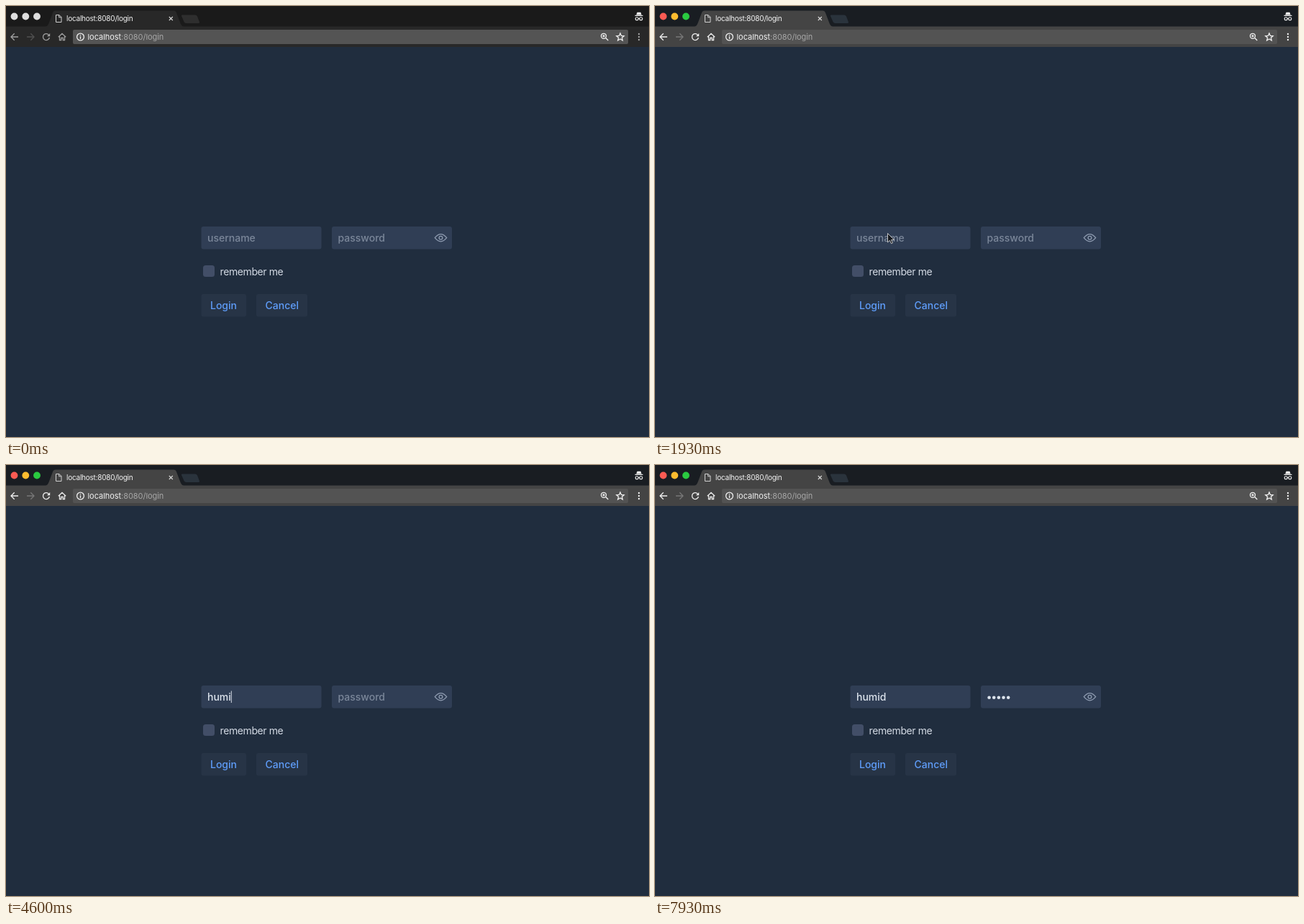
These frames come from a looping animation (894x600 px, 8000 ms). An HTML page:

```html
<!DOCTYPE html>
<html lang="en">
<head>
<meta charset="utf-8">
<title>Login</title>
<style>
  html, body { margin: 0; width: 100%; height: 100%; overflow: hidden; background: #202d3e; }
  svg { display: block; width: 100%; height: 100%; font: 14px Inter, "Open Sans", sans-serif; }
  .line { fill: none; stroke: var(--icon); stroke-width: 1.3; }
  .white { fill: none; stroke: #f2f2f2; stroke-width: 1.3; }
  .hint { fill: #7b879a; font-weight: 500; }
  .value { fill: #dce3ec; font-weight: 500; }
  .button { fill: #5f9dfa; font-weight: 500; }
  .field { fill: #303e55; }
  .box { fill: #273446; }
  .caret { fill: #d3dae4; }
</style>
</head>
<body>
<svg id="stage" viewBox="0 0 894 600">
  <rect width="894" height="600" fill="#202d3e"/>

  <g id="browser">
    <rect width="894" height="29" fill="var(--title)"/>
    <rect y="28.5" width="894" height="28.5" fill="var(--bar)"/>
    <path d="M55 29Q58 28 59.500 24L65 9.500Q66 6.500 69 6.500H233Q236 6.500 237 9.500L242.500 24Q244 28 247 29Z" fill="var(--bar)"/>
    <path d="M245 12.500H263Q265 12.500 266 14.500L269 22.500Q269.500 24 267.500 24H250.500Q248.500 24 247.500 22L244 14Q243.500 12.500 245 12.500Z" fill="var(--plus)"/>
    <circle cx="11.5" cy="14.500" r="4.900" fill="var(--close)"/>
    <circle cx="27.300" cy="14.500" r="4.900" fill="var(--min)"/>
    <circle cx="43" cy="14.500" r="4.900" fill="var(--max)"/>

    <path d="M69.500 12.500H74L77 15.500V22.500H69.500ZM73.700 12.500V15.800H77" fill="none" stroke="#d0d0d0"/>
    <text x="84" y="21" fill="#f4f4f4" font-size="10" letter-spacing="-.23">localhost:8080/login</text>
    <path d="M226.800 15L231.800 20M231.800 15L226.800 20" fill="none" stroke="#d8d8d8" stroke-width="1.100"/>

    <g fill="#eee">
      <path d="M876.300 12.500L877.500 8.700H882.500L883.700 12.500Z"/>
      <rect x="874.500" y="12.800" width="11" height="1.200"/>
      <path d="M875.200 17.800a2 2 0 1 0 4 0a2 2 0 1 0-4 0M880.800 17.800a2 2 0 1 0 4 0a2 2 0 1 0-4 0M879 17.500H881" fill="none" stroke="#eee" stroke-width="1.100"/>
    </g>

    <rect x="93" y="33" width="772" height="20" rx="2" fill="var(--address)"/>
    <path class="line" d="M17 43H7M11.700 38.300L7 43L11.700 47.700"/>
    <path d="M29 43H39M34.300 38.300L39 43L34.300 47.700" fill="none" stroke="var(--off)" stroke-width="1.300"/>
    <path class="line" d="M60 41A4.500 4.500 0 1 0 60.400 44"/>
    <path d="M61.200 38V42.300H57Z" fill="var(--icon)"/>
    <path class="line" d="M72.800 43.300L78 38.300L83.200 43.300M74.500 42.500V47.500H76.700V44.300H79.300V47.500H81.500V42.500"/>
    <circle class="white" cx="103.500" cy="43" r="4.900"/>
    <path class="white" d="M103.500 42.300V46M103.500 40V41.300"/>
    <text x="113.500" y="47" font-size="11" letter-spacing="-.05" fill="#f2f2f2">localhost<tspan fill="#a7a7a7">:8080/login</tspan></text>
    <circle class="white" cx="831" cy="41.800" r="3.500"/>
    <path class="white" d="M833.800 44.500L837.300 48M829.300 41.800H832.700M831 40.100V43.500"/>
    <path class="white" stroke-width="1" d="M854 38L855.500 41.500L859.200 41.800L856.400 44.300L857.300 48L854 46L850.700 48L851.600 44.300L848.800 41.800L852.500 41.500Z"/>
    <g fill="var(--icon)">
      <circle cx="880" cy="39" r="1.200"/><circle cx="880" cy="43" r="1.200"/><circle cx="880" cy="47" r="1.200"/>
    </g>
  </g>

  <rect class="field" x="271.500" y="307" width="167" height="31.500" rx="3"/>
  <path id="glow" d="M396 307H435.500Q438.500 307 438.500 310V335.500Q438.500 338.500 435.500 338.500H396Z" fill="#36435a"/>
  <rect class="field" x="453" y="307" width="167" height="31.500" rx="3"/>
  <text id="userHint" class="hint" x="280" y="328">username</text>
  <text id="user" class="value" x="280" y="328"></text>
  <text id="passHint" class="hint" x="461.500" y="328">password</text>
  <g id="dots" fill="#dce3ec"></g>
  <rect id="userCaret" class="caret" y="314.500" width="1" height="16.500"/>
  <rect id="passCaret" class="caret" y="314.500" width="1" height="16.500"/>
  <g fill="none" stroke="#8f9cb1" stroke-width="1.300">
    <path d="M596.300 322.700Q604.500 312.500 612.700 322.700Q604.500 332.900 596.300 322.700Z"/>
    <circle cx="604.500" cy="322.700" r="2.400"/>
  </g>

  <rect x="274" y="361" width="16" height="16" rx="3.500" fill="#424e67"/>
  <text x="297.500" y="374.500" fill="#d3dae4" letter-spacing="-.4">remember me</text>
  <rect class="box" x="271.500" y="401" width="62.500" height="31.500" rx="3"/>
  <rect class="box" x="348" y="401" width="71" height="31.500" rx="3"/>
  <text class="button" x="284" y="422">Login</text>
  <text class="button" x="360.500" y="422">Cancel</text>

  <path id="arrow" d="M0 0V12.500L2.900 9.800L4.900 14.200L7 13.300L5.100 9.100H9Z" fill="#15181d" stroke="#d5d5d5" stroke-width=".9"/>
  <path id="beam" d="M-2.500 -7.500Q0 -7.500 0 -5.500Q0 -7.500 2.500 -7.500M0 -5.500V5.500M-2.500 7.500Q0 7.500 0 5.500Q0 7.500 2.500 7.500" fill="none" stroke="#2a3545" stroke-opacity=".8"/>
</svg>

<script>
const LOOP = 8000, STEP = 1000 / 15;
const $ = id => document.getElementById(id);

const themes = {
  idle: { title: "#1a1a1a", bar: "#282828", plus: "#2e2e2e", address: "#545454", icon: "#a0a0a0",
          off: "#505050", close: "#dedede", min: "#dedede", max: "#dedede" },
  active: { title: "#191d22", bar: "#444444", plus: "#2a333c", address: "#535353", icon: "#eeeeee",
            off: "#777777", close: "#fc5b53", min: "#fdbc2f", max: "#2ac940" }
};

const name = "humid";
const nameKeys = [3930, 4200, 4330, 4600, 4800];
const passKeys = [6530, 6800, 7000, 7200, 7400];
const DOT = 6.65;

// Pointer paths: time, x, y
const arrowPath = [
  [730, 442, 518], [800, 402, 457], [867, 372.5, 421], [1067, 372.5, 421], [1133, 350, 360],
  [1200, 334, 319], [1267, 327.5, 307.5], [1333, 325, 303.5], [1467, 323, 309], [1600, 323.5, 316.5]
];
const beamPath = [
  [5270, 324, 323], [5400, 356, 320], [5530, 415, 317], [5667, 464, 321], [5730, 471, 323]
];

const within = (t, a, b) => t >= a && t < b;
const typed = (keys, t) => keys.filter(k => t >= k).length;
const show = (id, on) => $(id).setAttribute("visibility", on ? "visible" : "hidden");

function along(path, t) {
  if (t <= path[0][0]) return path[0].slice(1);
  for (let i = 1; i < path.length; i++) {
    const [t0, x0, y0] = path[i - 1], [t1, x1, y1] = path[i];
    if (t < t1) {
      const k = (t - t0) / (t1 - t0);
      return [x0 + (x1 - x0) * k, y0 + (y1 - y0) * k];
    }
  }
  return path[path.length - 1].slice(1);
}

function place(id, path, t, on) {
  const snapped = Math.floor(t / STEP + 0.06) * STEP;
  $(id).setAttribute("transform", `translate(${along(path, snapped)})`);
  show(id, on);
}

for (let i = 0; i < name.length; i++) {
  const dot = document.createElementNS("http://www.w3.org/2000/svg", "circle");
  dot.setAttribute("cx", 464.6 + DOT * i);
  dot.setAttribute("cy", 323.7);
  dot.setAttribute("r", 2.3);
  $("dots").append(dot);
}

function render(t) {
  const theme = themes[t < 1930 ? "idle" : "active"];
  for (const key in theme) $("browser").style.setProperty("--" + key, theme[key]);

  const letters = typed(nameKeys, t), dots = typed(passKeys, t);
  $("user").textContent = name.slice(0, letters);
  show("userHint", !letters);
  show("passHint", !dots);
  [...$("dots").children].forEach((dot, i) => dot.setAttribute("visibility", i < dots ? "visible" : "hidden"));

  const end = letters ? $("user").getComputedTextLength() : 0;
  $("userCaret").setAttribute("x", 280 + end);
  $("passCaret").setAttribute("x", 461.5 + DOT * dots);
  show("userCaret", within(t, 2800, 3270) || within(t, 3800, 5270));
  show("passCaret", within(t, 5870, 6400) || within(t, 6530, 7930));
  show("glow", within(t, 2800, 2870));

  place("arrow", arrowPath, t, within(t, 730, 2330));
  place("beam", beamPath, t, within(t, 2330, 3930) || within(t, 5270, 6530));
}

function tick(now) {
  render(now % LOOP);
  requestAnimationFrame(tick);
}
render(0);
requestAnimationFrame(tick);
</script>
</body>
</html>
```
